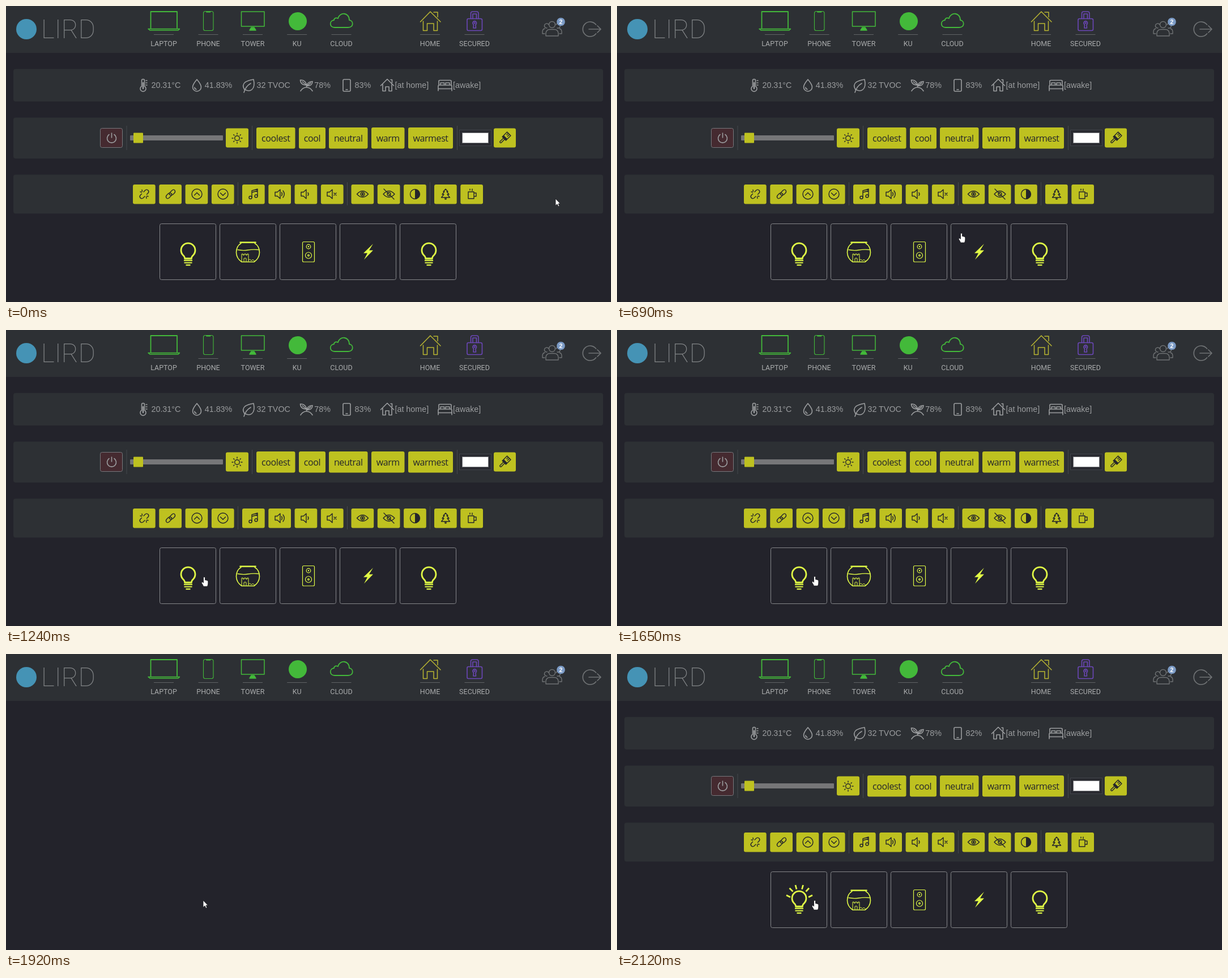
An HTML page that plays this animation: 1068 px wide and 524 px high, repeating every 3.16 s.

```html
<!DOCTYPE html>
<html lang="en">
<head>
<meta charset="utf-8">
<title>Home dashboard</title>
<style>
  html, body { margin: 0; width: 100%; height: 100%; overflow: hidden; background: #23232b; }
  svg { display: block; width: 1068px; height: 524px; }
  .line { fill: none; stroke-linecap: round; stroke-linejoin: round; }
  .panel { fill: #2d3034; }
  .green { stroke: #43b93a; stroke-width: 1.8; }
  .rule { stroke: #606365; }
  .label { font: 12.5px Roboto, sans-serif; fill: #a9abac; text-anchor: middle; }
  .brand { font: 100 46px Roboto, sans-serif; fill: #85888a; }
  .badge { font: bold 10.5px "Liberation Sans", sans-serif; fill: #fff; text-anchor: middle; }
  .stat { font: 14.3px "Liberation Sans", Arial, sans-serif; fill: #9b9d9f; }
  .gray { stroke: #9b9d9f; stroke-width: 1.6; }
  .dim { stroke: #6f7274; stroke-width: 1.4; }
  .btn { fill: #bec120; }
  .word { font: 16px "Open Sans", sans-serif; letter-spacing: -.4px; fill: #24252b; text-anchor: middle; }
  .ink { stroke: #24252b; stroke-width: 1.4; }
  .solid { fill: #24252b; stroke: none; }
  .card { fill: none; stroke: #85868a; }
  .lime { stroke: #e1fb46; stroke-width: 1.4; }
  .bulb { stroke-width: 2.8; stroke-linecap: butt; }

  /* reload: the page body vanishes, then returns with new values */
  .body { animation: reload 3160ms step-end infinite; }
  .spark { opacity: 0; animation: spark 3160ms step-end infinite; }
  .before { animation: before 3160ms step-end infinite; }
  .after { animation: after 3160ms step-end infinite; }
  @keyframes reload { 0% { opacity: 1 } 60.759% { opacity: 0 } 67.089%, 100% { opacity: 1 } }
  @keyframes spark { 0% { opacity: 0 } 64.873% { opacity: 1 } 67.089%, 100% { opacity: 0 } }
  @keyframes before { 0% { opacity: 1 } 67.089%, 100% { opacity: 0 } }
  @keyframes after { 0% { opacity: 0 } 67.089%, 100% { opacity: 1 } }
</style>
</head>
<body>
<svg viewBox="0 0 1068 524">
  <defs>
    <g id="bulb" class="line lime bulb">
      <path d="M-6 11.500V10Q-6.500 7.500-9 5.600A12.500 12.500 0 1 1 9 5.600Q6.500 7.500 6 10V11.500Z"/>
      <path d="M-7.500 14.800H7.500M-7 19H7M-4 23.200H4" stroke-width="2.200"/>
    </g>
    <path id="speaker" d="M-8-3.500H-4L1-8V8L-4 3.500H-8Z"/>
    <path id="eye" d="M-10 0Q0-11 10 0Q0 11-10 0Z"/>
  </defs>

  <rect width="1068" height="524" fill="#23232b"/>
  <rect class="panel" width="1068" height="83"/>

  <!-- header -->
  <circle cx="36" cy="41" r="18" fill="#4593b5"/>
  <text class="brand" x="62" y="57">LIRD</text>
  <g class="line green">
    <path d="M255.500 39V10H302V39"/>
    <path d="M251 40.500H306.500L304 43H254Z" stroke-width="1.500"/>
    <rect x="348.500" y="9.500" width="17.500" height="34" rx="3" stroke-width="1.100"/>
    <path d="M354 10.500H360.500" stroke-width="2"/>
    <rect x="415.500" y="10" width="40.500" height="26" stroke-width="1.500"/>
    <path d="M433 38H438L441 43H430Z" fill="#43b93a" stroke-width="1.500"/>
    <path d="M580 38H604C614 38 614 26 606 25C606 11 589 10 586 22C582 20 579 22 579 25C570 26 571 38 580 38Z"/>
  </g>
  <circle cx="515" cy="27" r="16" fill="#43b93a"/>
  <path class="line" stroke="#b8b532" stroke-width="1.500" d="M731.500 28L749 10L767 28M755 11H762V19.500M736.500 27V43.500H743.500V31H755V43.500H761.500V27"/>
  <g class="line" stroke="#6c47b8" stroke-width="1.600">
    <path d="M816 22.500H838Q840.500 22.500 840.500 25V41Q840.500 43.500 838 43.500H816Q814 43.500 814 41V25Q814 22.500 816 22.500Z"/>
    <path d="M820.500 22V13Q820.500 10 823.500 10H831Q834 10 834 13V22M824 22V14H830.500V22"/>
    <path d="M825.500 33A3.300 3.300 0 1 1 829 33L829.500 39H825Z"/>
    <circle cx="827.200" cy="30" r=".8"/>
  </g>
  <g id="links"></g>
  <g class="line dim">
    <circle cx="964" cy="33" r="5.500"/>
    <path d="M953 53V48Q954 41.500 960 41.500H968Q974 41.500 975 48V53Z"/>
    <path d="M957.500 32.500A4 4 0 1 0 955 39M951 40Q947 41 947 46V49H951M971 33A4 4 0 1 1 973 39M977 40Q981 41 981 46V49H977"/>
    <path d="M1041.500 33A13 13 0 1 0 1041.500 49M1029 41H1050M1044 35L1050 41L1044 47" stroke-width="1.700"/>
  </g>
  <circle cx="979.500" cy="28" r="7.300" fill="#7c9bc6"/>
  <text class="badge" x="979.500" y="31.800">2</text>

  <g class="body">
    <rect class="panel" x="13" y="111.500" width="1041" height="57.500" rx="4"/>
    <rect class="panel" x="13" y="197.500" width="1041" height="72.500" rx="4"/>
    <rect class="panel" x="13" y="298.500" width="1041" height="69" rx="4"/>

    <!-- sensors -->
    <g class="line gray">
      <path d="M239.500 142V132Q239.500 129.500 242 129.500T244.500 132V142A5 5 0 1 1 239.500 142ZM247 132H249M247 136H249M247 140H249"/>
      <path d="M242 136V146" stroke-width="2.500"/>
      <path d="M337 130Q344.500 139 344.500 143.500A7.500 7.500 0 0 1 329.500 143.500Q329.500 139 337 130ZM333 144Q333 147 336 147.500"/>
      <path d="M420 153Q423 142 432 137M421 148Q416 140 422 135Q426 132 437 130Q440 143 434 148Q429 152 422 148"/>
      <path d="M520 150.500Q524 144 530.500 144T541 150.500M530.500 144V140M530.500 140Q520 140 519.500 131Q529 131 530.500 140ZM531 141.500Q532 134 541 133.500Q541 141.500 531 141.500M523 134L530.500 140M531 141.500L538 136"/>
      <rect x="595" y="130" width="13" height="21" rx="2"/>
      <path d="M600 148H603"/>
      <path d="M661.500 141L673 129.500L684.500 141M665 139V150.500H670V143H676V150.500H681V139M679 130.500H681.500V136"/>
      <path d="M764 139V133Q764 131.500 766 131.500H784Q786 131.500 786 133V139M763 150V142Q763 140 765 140H785Q787 140 787 142V150M763 146.500H787M767 139V136H773.500V139M776 139V136H783V139"/>
    </g>
    <g class="stat">
      <text x="256.500" y="145">20.31°C</text>
      <text x="350.800" y="145">41.83%</text>
      <text x="442.500" y="145">32 TVOC</text>
      <text x="544.300" y="145">78%</text>
      <text class="before" x="615.500" y="145">83%</text>
      <text class="after" x="615.500" y="145">82%</text>
      <text x="686.500" y="145">[at home]</text>
      <text x="789" y="145">[awake]</text>
    </g>

    <!-- light controls -->
    <rect x="166.500" y="216.500" width="39" height="34" rx="3" fill="#452a30" stroke="#77787c"/>
    <path class="line gray" stroke-width="1.500" d="M182 227.500A8 8 0 1 0 191 227.500M186.500 225V233"/>
    <rect x="219" y="229" width="164" height="9" rx="1" fill="#767678"/>
    <rect class="btn" x="225" y="224.500" width="17" height="18" rx="1"/>
    <rect class="btn" x="388" y="216.500" width="40" height="34" rx="3"/>
    <g class="line ink" transform="translate(408 234)">
      <circle r="4.300"/>
      <path d="M0-9V-7M0 7V9M-9 0H-7M7 0H9M-6.300-6.300L-5-5M5 5L6.300 6.300M-6.300 6.300L-5 5M5-5L6.300-6.300"/>
    </g>
    <g id="words"></g>
    <rect x="800.500" y="219.500" width="56" height="28" fill="#292a30" stroke="#41444a"/>
    <rect x="805.500" y="224.500" width="46" height="18" fill="#fff" stroke="#77787c"/>
    <rect class="btn" x="861" y="216.500" width="39" height="34" rx="3"/>
    <g class="line ink" transform="translate(880 234) rotate(45)">
      <path d="M-4.500-2V-11H4.500V-2ZM-4.500-2V1H4.500V-2M-1.500 1V10Q0 12 1.500 10V1M-1.500-11V-7M1.500-11V-6"/>
      <path class="solid" d="M-4.500-2H4.500V1H-4.500Z"/>
    </g>

    <!-- scene controls -->
    <g id="tiles"></g>
    <g class="line ink">
      <path transform="translate(244 333)" d="M-1-4L2-7Q5-9 7-6.500T6.500-1.500L4.500 .5M1 4L-2 7Q-5 9-7 6.500T-6.500 1.500L-4.500-.5M-7-4L-4.500-3.500M-4-7.500L-3.500-5M7 4L4.500 3.500M4 7.500L3.500 5"/>
      <path transform="translate(290.500 333)" d="M-2 1Q-3-1 0-4L3-7Q6-9 7.500-6.500T6.500-1.500L4 1Q1 3-1 1M2-1Q3 1 0 4L-3 7Q-6 9-7.500 6.500T-6.500 1.500L-4-1Q-1-3 1-1"/>
      <path transform="translate(337 333)" d="M-9 0A9 9 0 1 1 9 0A9 9 0 1 1-9 0M-4.500 2L0-2.500L4.500 2"/>
      <path transform="translate(383 333)" d="M-9 0A9 9 0 1 1 9 0A9 9 0 1 1-9 0M-4.500-2L0 2.500L4.500-2"/>
      <g transform="translate(437 333)">
        <path d="M-3 6V-6L7-9V3M-3-3L7-6"/>
        <circle cx="-5.500" cy="6" r="2.500"/><circle cx="4.500" cy="3.500" r="2.500"/>
      </g>
      <use href="#speaker" x="483" y="333"/>
      <path d="M486.500 330Q488.500 333 486.500 336M489 327Q493.500 333 489 339"/>
      <use href="#speaker" x="529" y="333"/>
      <path d="M533 330.500Q535 333 533 335.500"/>
      <use href="#speaker" x="575" y="333"/>
      <path d="M579 331L583 335M583 331L579 335"/>
      <use href="#eye" x="629.500" y="333"/>
      <circle cx="629.500" cy="333" r="3.500"/><circle class="solid" cx="629.500" cy="333" r="2"/>
      <use href="#eye" x="676" y="333"/>
      <circle cx="676" cy="333" r="3"/>
      <path d="M667 324L685 342"/>
      <circle cx="722" cy="333" r="8.500"/>
      <path class="solid" d="M722 324.500A8.500 8.500 0 0 1 722 341.500Z"/>
      <path transform="translate(776 333)" d="M0-9L4-4.500H2L6 .5H3L7.500 6H-7.500L-3 .5H-6L-2-4.500H-4ZM-1 6V9H1V6"/>
      <path transform="translate(822 333)" d="M-6-4H4V8H-6ZM4-2H8V4H4M-3-7V-9M1-6V-9"/>
    </g>
    <g id="rules"></g>

    <!-- devices -->
    <g id="cards"></g>
    <use href="#bulb" x="321.500" y="435.500"/>
    <path class="line lime bulb after" stroke-width="2.500" d="M299 427L306 430.500M304.500 414.500L310.500 420.500M315 409L317 416.500M328.500 409L326.500 416.500M339 414.500L333.500 420.500M345 427L338 430.500"/>
    <use href="#bulb" x="746.500" y="435.500"/>
    <g class="line lime">
      <path d="M413.500 418.500H440.500" stroke-width="2.600"/>
      <path d="M415 420Q406.500 425 406.500 436.500Q407 447 416 453H438Q447 447 447.500 436.500Q447.500 425 439 420" stroke-width="1.600"/>
      <path d="M409 431.500Q418 433.500 427 432T445.500 431.500"/>
      <path d="M416 452V439H418.500V441H420.500V439H423.500V441H425.500V439H428V452M420 452V447Q422 445 424 447V452M428 450Q431 447 433 451Q436 447 439 452" stroke-width="1"/>
      <g stroke-width="1.200">
        <rect x="523.500" y="417.500" width="21" height="35.500" rx="2"/>
        <circle cx="534" cy="426" r="3.800"/><circle cx="534" cy="441.500" r="5.500"/>
        <circle cx="534" cy="426" r=".6"/><circle cx="534" cy="441.500" r="1.400"/>
      </g>
    </g>
    <path fill="#e1fb46" d="M648 421L631 437.500H638L632 449L648 432.500H641Z"/>
  </g>

  <rect class="spark" x="532" y="189" width="2" height="1" fill="#5f6d3a"/>

  <g id="cursor" fill="#fff" stroke="#15151a" stroke-width=".8" stroke-linejoin="round">
    <path id="arrow" d="M0 0V12.500L3 9.800L5 14L7 13.200L5 9H8.500Z"/>
    <path id="hand" d="M-1.500 1Q0-1 1.500 1V5.500L5 6.200Q6.800 6.800 6.800 8.500V12Q6.500 14.500 5.500 17H-1.500Q-2 14.500-4.500 11.500Q-5.500 9-3.500 9L-1.500 10.500Z"/>
  </g>
</svg>

<script>
const LOOP = 3160;
const $ = id => document.getElementById(id);
const box = (cls, x, y, w, h) => `<rect class="${cls}" x="${x}" y="${y}" width="${w}" height="${h}" rx="3"/>`;

$("links").innerHTML = [
  ["LAPTOP", 278.5], ["PHONE", 357], ["TOWER", 435.5], ["KU", 513.7],
  ["CLOUD", 592], ["HOME", 748.5], ["SECURED", 827]
].map(([name, x]) =>
  `<path class="rule" d="M${x - 17.5} 50.500h35"/><text class="label" x="${x}" y="71">${name}</text>`
).join("");

$("words").innerHTML = [
  ["coolest", 442, 68.5], ["cool", 517, 47], ["neutral", 570, 68.5], ["warm", 645, 58.5], ["warmest", 710, 79]
].map(([name, x, w]) =>
  box("btn", x, 215, w, 37.5) + `<text class="word" x="${x + w / 2}" y="240">${name}</text>`
).join("");

$("tiles").innerHTML = [[224, 4], [417, 4], [609.5, 3], [756, 2]].map(([x, n]) =>
  Array.from({ length: n }, (_, i) => box("btn", x + i * 46.3, 316, 39.7, 34.5)).join("")
).join("");

$("rules").innerHTML = [[213, 212], [434.5, 212], [796.5, 212], [409.5, 312], [602.5, 312], [748.5, 312]]
  .map(([x, y]) => `<path stroke="#45484c" d="M${x} ${y}v${y < 300 ? 43 : 41}"/>`).join("");

$("cards").innerHTML = Array.from({ length: 5 }, (_, i) =>
  box("card", 271.5 + i * 106, 385.5, 99, 99)).join("");

// cursor stops: time, x, y
const stops = [
  [0, 970, 341], [410, 945, 341], [480, 895, 345], [550, 812, 358], [620, 712, 378],
  [690, 608, 402], [760, 515, 424], [820, 440, 434], [890, 384, 426], [960, 374, 430],
  [1030, 366, 433], [1100, 359, 435], [1170, 354, 436], [1240, 350, 437], [1380, 349, 437],
  [1650, 349, 436]
];
const onCard = (x, y) => y > 385 && y < 485 && x > 271 && x < 795 && (x - 271) % 106 < 100;

function draw(now) {
  const t = now % LOOP;
  const [, x, y] = stops.findLast(s => s[0] <= t);
  const busy = t >= 1850 && t < 2120;
  const hand = onCard(x, y) && !busy;
  $("cursor").setAttribute("transform", `translate(${busy ? x - 1 : x} ${y})`);
  $("hand").style.display = hand ? "" : "none";
  $("arrow").style.display = hand ? "none" : "";
}

const start = performance.now();
function tick() {
  draw(performance.now() - start);
  requestAnimationFrame(tick);
}
tick();
</script>
</body>
</html>
```
